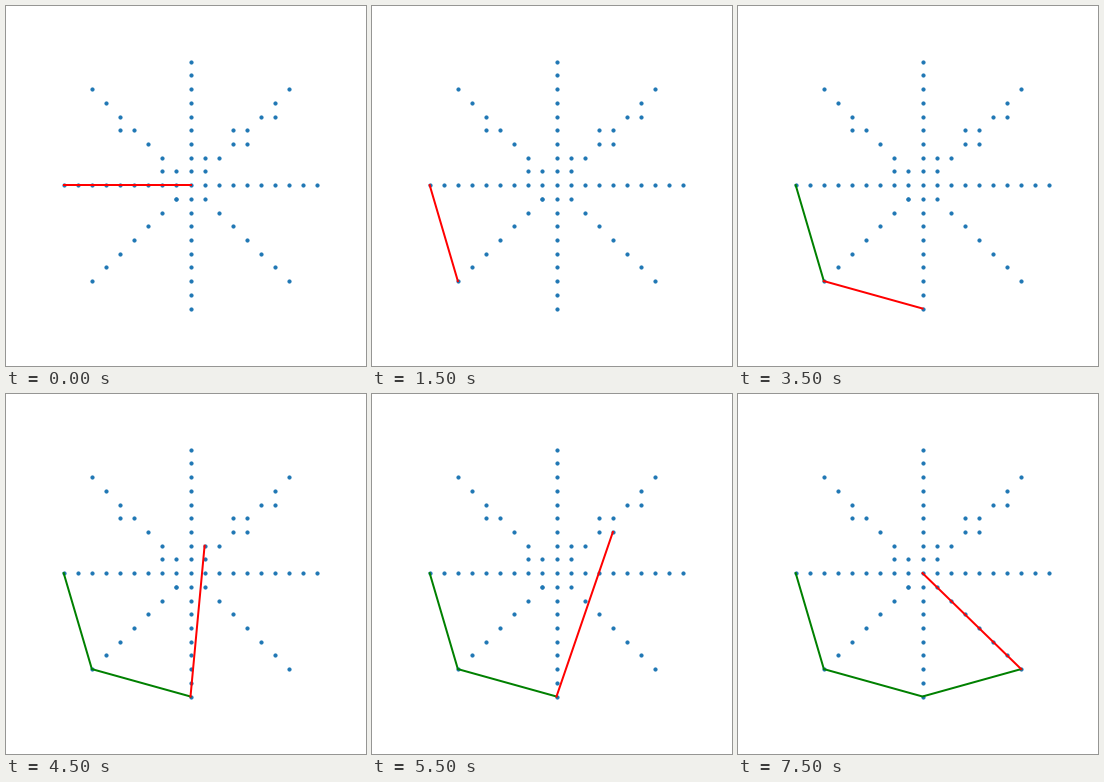
Animation of 360 by 360 pixels, one loop 8000 ms. Source, as a matplotlib script:

```python
from itertools import islice

import matplotlib.pyplot as plt
from matplotlib.animation import FuncAnimation

STEPS = 16
STEP_MS = 500


def star_points():
    points = [(0, 0), (1, 2), (-2, 1), (-1, -1), (3, 4), (4, 3), (-5, 4), (6, 5)]
    for k in range(7, 0, -1):
        points += [(k, k), (k, -k), (-k, -k), (-k, k)]
    for k in range(9, 0, -1):
        points += [(k, 0), (0, -k), (-k, 0), (0, k)]
    return points


def turns_right(origin, a, b):
    (ox, oy), (ax_, ay), (bx, by) = origin, a, b
    return (ax_ - ox) * (by - oy) - (ay - oy) * (bx - ox) < 0


def gift_wrap(points):
    """Yield the hull so far and each improving candidate edge."""
    hull = [min(points)]
    while True:
        best = points[0]
        yield hull[:], (hull[-1], best)
        for p in points:
            if turns_right(hull[-1], best, p):
                best = p
                yield hull[:], (hull[-1], best)
        if best == hull[0]:
            return
        hull.append(best)


points = star_points()
steps = list(islice(gift_wrap(points), STEPS))

fig = plt.figure(figsize=(5, 5), dpi=72, facecolor="white")
ax = fig.add_axes([0.125, 0.11, 0.775, 0.77])
ax.set_xlim(-9.9, 9.9)
ax.set_ylim(-10.305, 9.915)
ax.axis("off")

ax.scatter(*zip(*points), s=10, color="tab:blue")
hull_line, = ax.plot([], [], color="g", lw=2)
probe_line, = ax.plot([], [], color="r", lw=2)


def update(i):
    hull, probe = steps[i]
    hull_line.set_data(*zip(*hull))
    hull_line.set_visible(len(hull) > 1)
    probe_line.set_data(*zip(*probe))
    return hull_line, probe_line


anim = FuncAnimation(fig, update, frames=STEPS, interval=STEP_MS,
                     repeat=True, repeat_delay=0)
plt.show()
```
